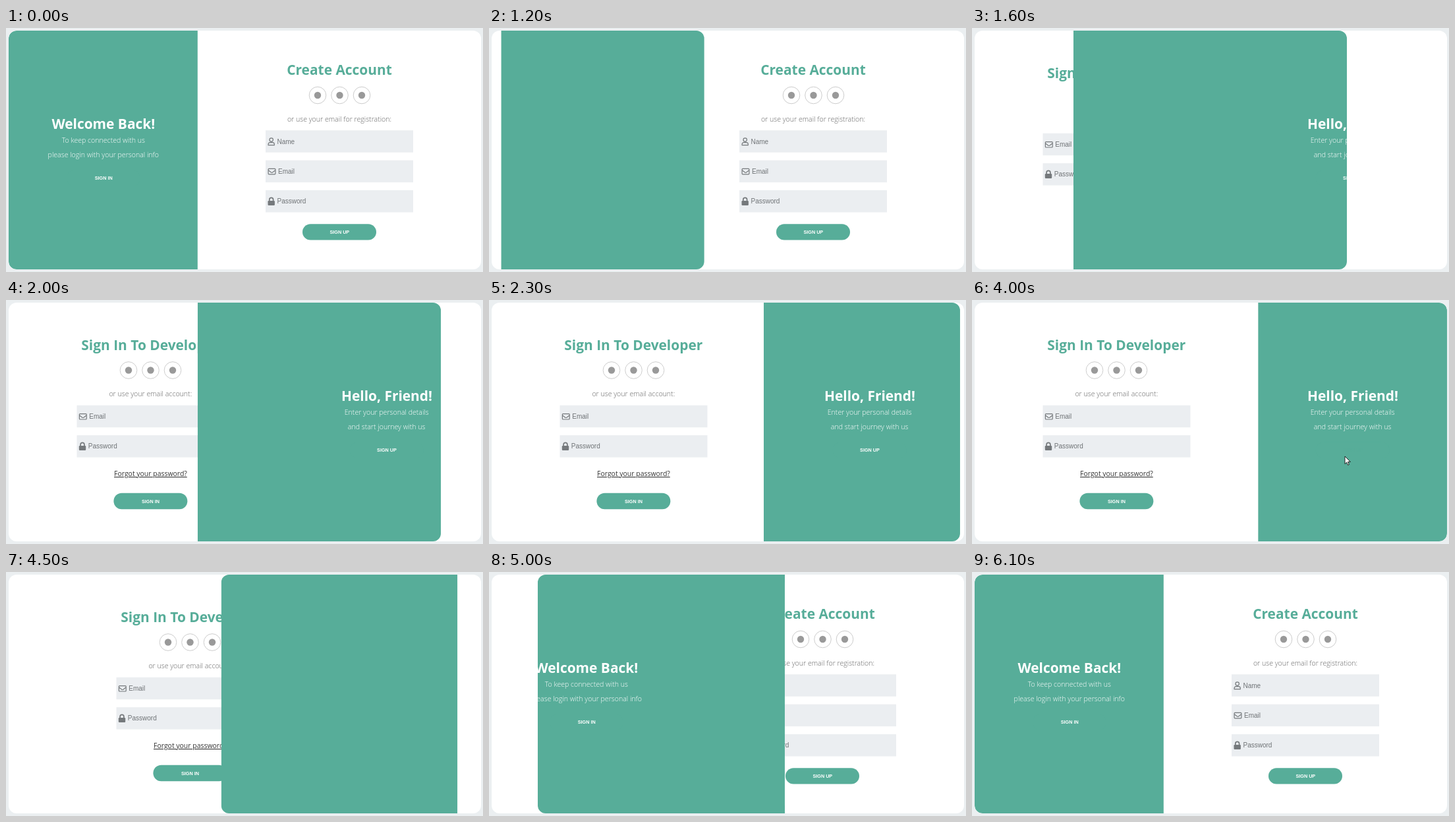
An HTML page for the animation above (6.4 s loop, 724x370 px).

```html
<!DOCTYPE html>
<html lang="en">
<head>
<meta charset="utf-8">
<title>Sign in / sign up slider</title>
<style>
  :root { --green: #57ad99; --loop: 6400ms -10ms infinite step-end; }
  html, body { margin: 0; width: 724px; height: 370px; overflow: hidden; background: #ebeff1; }
  .card { position: absolute; left: 4px; top: 4px; width: 717px; height: 362px;
          border-radius: 12px; overflow: hidden; background: #fff; }
  svg.layer { position: absolute; left: 0; top: 0; width: 717px; height: 362px; }
  .defs { position: absolute; width: 0; height: 0; }

  text { text-anchor: middle; font: 300 10.6px "Open Sans", sans-serif; fill: #666; }
  .title { font-weight: 700; font-size: 20.9px; fill: var(--green); }
  .link { font-weight: 400; font-size: 10.45px; fill: #333; text-decoration: underline; }
  .label { font: 700 7.25px "Liberation Sans", Arial, sans-serif; fill: #fff; }
  .hint { font: 400 10px "Liberation Sans", Arial, sans-serif; fill: #6f7376; text-anchor: start; }
  .pill { fill: var(--green); }
  .field { fill: #ebeef1; }
  .panel { background: var(--green); }
  .panel text { fill: #fff; }
  .panel .pill { fill: none; stroke: #fff; }
  .panel .hot .pill { fill: #fff; }
  .panel .hot text { fill: var(--green); }

  .panel   { animation: panel var(--loop); }
  .hello   { animation: show-hello var(--loop); }
  .welcome { animation: show-welcome var(--loop); }
  .sign-in { animation: show-in var(--loop), slide-in var(--loop); }
  .sign-up { animation: show-up var(--loop), slide-up var(--loop); }
  .welcome .hot { animation: hover-in var(--loop); }
  .hello .hot   { animation: hover-up var(--loop); }
  .cursor  { animation: cursor var(--loop); }

  /* The panel stretches while it crosses; it ticks at 10 steps a second. */
  @keyframes panel {
    0%, 17.1875% { clip-path: inset(0 60% 0 0 round 12px 0 0 12px); }
    18.75%  { clip-path: inset(0 55% 0 2% round 0 12px 12px 0); animation-timing-function: steps(2); }
    21.875% { clip-path: inset(0 41% 0 7.7% round 0 12px 12px 0); animation-timing-function: steps(2); }
    25%     { clip-path: inset(0 21.2% 0 20.9% round 0 12px 12px 0); }
    28.125% { clip-path: inset(0 14.9% 0 24.3% round 0 12px 12px 0); }
    31.25%  { clip-path: inset(0 8.5% 0 40% round 0 12px 12px 0); animation-timing-function: steps(3); }
    35.9375% { clip-path: inset(0 .84% 0 57.6% round 0 12px 12px 0); animation-timing-function: steps(2); }
    39.0625% { clip-path: inset(0 0 0 60% round 0 12px 12px 0); }
    65.625% { clip-path: inset(0 3.8% 0 50% round 12px 0 0 12px); }
    68.75%  { clip-path: inset(0 4.4% 0 47.5% round 12px 0 0 12px); }
    70.3125% { clip-path: inset(0 5% 0 45% round 12px 0 0 12px); animation-timing-function: steps(3); }
    75%     { clip-path: inset(0 26.9% 0 14% round 12px 0 0 12px); }
    78.125% { clip-path: inset(0 37.94% 0 9.76% round 12px 0 0 12px); }
    81.25%  { clip-path: inset(0 54% 0 2% round 12px 0 0 12px); }
    82.8125% { clip-path: inset(0 59.4% 0 0 round 12px 0 0 12px); }
    85.9375%, 100% { clip-path: inset(0 60% 0 0 round 12px 0 0 12px); }
  }
  @keyframes show-hello   { 0%, 65.625%, 100% { opacity: 0 } 18.75% { opacity: 1 } }
  @keyframes show-welcome { 0%, 65.625%, 100% { opacity: 1 } 18.75% { opacity: 0 } }
  @keyframes show-in { 0%, 73.4375%, 100% { opacity: 0 } 23.4375% { opacity: 1 } }
  @keyframes show-up { 0%, 73.4375%, 100% { opacity: 1 } 23.4375% { opacity: 0 } }
  @keyframes slide-in {
    0% { transform: none }
    65.625% { transform: translateX(14px) }
    68.75% { transform: translateX(36px); animation-timing-function: steps(2) }
    71.875% { transform: translateX(84px) }
    73.4375%, 100% { transform: none }
  }
  @keyframes slide-up {
    0% { transform: none }
    18.75% { transform: translateX(-14px); animation-timing-function: steps(2) }
    21.875% { transform: translateX(-60px) }
    23.4375%, 100% { transform: none }
  }
  @keyframes hover-in { 0%, 18.75%, 100% { opacity: 0 } 12.5% { opacity: .6 } 15.625% { opacity: 1 } }
  @keyframes hover-up {
    0%, 65.625%, 100% { opacity: 0 }
    57.8125% { opacity: .25; animation-timing-function: steps(3) }
    62.5% { opacity: 1 }
  }
  @keyframes cursor {
    0%, 100% { opacity: 0; transform: translate(12px, 146px) }
    6.25% { opacity: 1; transform: translate(12px, 146px) }
    7.8125% { opacity: 1; transform: translate(90px, 250px) }
    9.375% { opacity: 1; transform: translate(185px, 232px) }
    12.5% { opacity: 1; transform: translate(160px, 238px) }
    18.75% { opacity: 0; transform: translate(160px, 238px) }
    53.125% { opacity: 1; transform: translate(591.5px, 298px) }
    54.6875% { opacity: 1; transform: translate(562px, 224px) }
    57.8125% { opacity: 1; transform: translate(566px, 237px) }
    65.625% { opacity: 0; transform: translate(566px, 237px) }
  }
</style>
</head>
<body>
<svg class="defs">
  <defs>
    <rect id="field" class="field" width="224" height="33.5"/>
    <rect id="pill" class="pill" x="-56" y="-12.2" width="112" height="24.4" rx="12.2"/>
    <g id="socials" fill="#fff" stroke="#ccc">
      <circle cx="-33.5" r="12.8"/><circle r="12.8"/><circle cx="33.5" r="12.8"/>
      <g fill="#999" stroke="none">
        <circle cx="-33.5" r="5.2"/><circle r="5.2"/><circle cx="33.5" r="5.2"/>
      </g>
    </g>
    <g id="mail" fill="none" stroke="#75797c" stroke-width="1.2">
      <rect x="-5.4" y="-4.2" width="10.8" height="8.4" rx="1"/>
      <path d="M-5.2-1.8L-1 1.4Q0 2 1 1.4L5.2-1.8"/>
    </g>
    <g id="lock">
      <rect x="-5.2" y="-1" width="10.4" height="7" rx="1.2" fill="#75797c"/>
      <path d="M-2.9-1v-1.8a2.9 2.9 0 0 1 5.8 0V-1" fill="none" stroke="#75797c" stroke-width="1.7"/>
    </g>
    <g id="user" fill="none" stroke="#75797c" stroke-width="1.2">
      <circle cy="-2.7" r="2.7"/>
      <path d="M-4.6 5.4V4Q-4.6 1.4-2 1.4H2Q4.6 1.4 4.6 4V5.4Z"/>
    </g>
  </defs>
</svg>

<div class="card">
  <svg class="layer sign-up" viewBox="4 4 717 362">
    <text class="title" x="506" y="71.4">Create Account</text>
    <use href="#socials" x="506.5" y="102"/>
    <text x="506" y="142">or use your email for registration:</text>
    <use href="#field" x="394" y="155.2"/>
    <use href="#field" x="394" y="200.6"/>
    <use href="#field" x="394" y="246"/>
    <use href="#user" x="402.7" y="172.3"/><text class="hint" x="411.5" y="175.5">Name</text>
    <use href="#mail" x="403.5" y="217.6"/><text class="hint" x="413" y="220.8">Email</text>
    <use href="#lock" x="402.7" y="263"/><text class="hint" x="411.5" y="266.2">Password</text>
    <use href="#pill" x="506" y="309.4"/>
    <text class="label" x="506.3" y="312">SIGN UP</text>
  </svg>

  <svg class="layer sign-in" viewBox="4 4 717 362">
    <text class="title" x="219.3" y="75.9">Sign In To Developer</text>
    <use href="#socials" x="219.5" y="106.5"/>
    <text x="219.3" y="146.4">or use your email account:</text>
    <use href="#field" x="107.5" y="159.7"/>
    <use href="#field" x="107.5" y="205.1"/>
    <use href="#mail" x="116.8" y="176.8"/><text class="hint" x="126.3" y="180">Email</text>
    <use href="#lock" x="116" y="222"/><text class="hint" x="124.8" y="225.3">Password</text>
    <text class="link" x="219.4" y="267">Forgot your password?</text>
    <use href="#pill" x="219.4" y="305"/>
    <text class="label" x="219.5" y="307.6">SIGN IN</text>
  </svg>

  <svg class="layer panel" viewBox="4 4 717 362">
    <g class="welcome">
      <text class="title" x="147.8" y="153.3">Welcome Back!</text>
      <text x="147.8" y="174">To keep connected with us</text>
      <text x="147.8" y="196">please login with your personal info</text>
      <use href="#pill" x="147.9" y="227.8"/>
      <text class="label" x="148.2" y="230.4">SIGN IN</text>
      <g class="hot">
        <use href="#pill" x="147.9" y="227.8"/>
        <text class="label" x="148.2" y="230.4">SIGN IN</text>
      </g>
    </g>
    <g class="hello">
      <text class="title" x="578" y="153.3">Hello, Friend!</text>
      <text x="577.7" y="174">Enter your personal details</text>
      <text x="577.7" y="196">and start journey with us</text>
      <use href="#pill" x="577.8" y="227.8"/>
      <text class="label" x="578" y="230.4">SIGN UP</text>
      <g class="hot">
        <use href="#pill" x="577.8" y="227.8"/>
        <text class="label" x="578" y="230.4">SIGN UP</text>
      </g>
    </g>
  </svg>

  <svg class="layer" viewBox="4 4 717 362">
    <path class="cursor" d="M0 0v11.6l2.7-2.5 1.8 4.2 1.9-.8-1.8-4.1h3.7z"
          fill="#fff" stroke="#111" stroke-width=".9"/>
  </svg>
</div>
</body>
</html>
```
